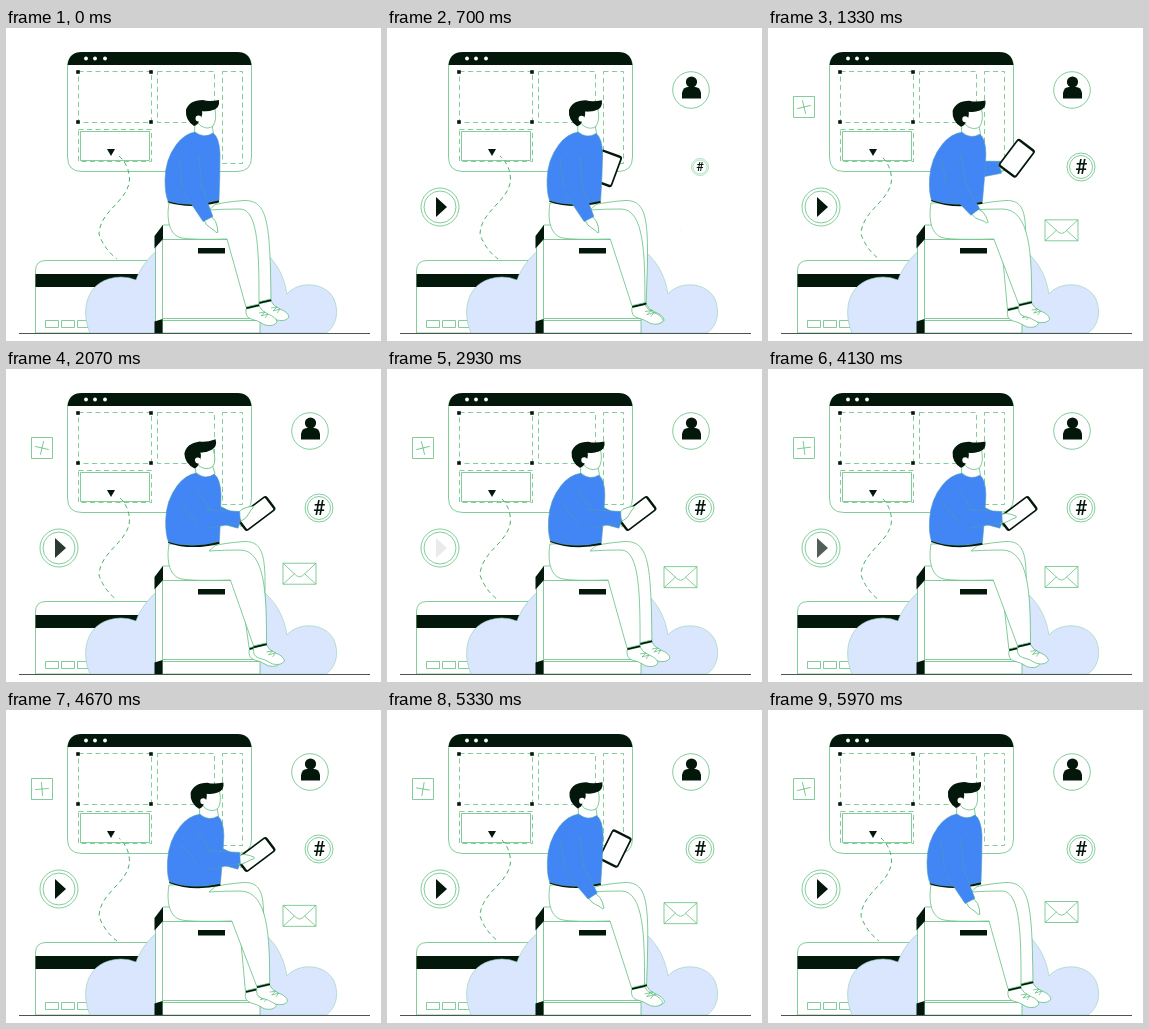
These frames come from a looping animation (375 px wide and 313 px high, 6 s). An HTML page with a canvas:

```html
<!DOCTYPE html>
<html>
<head>
<meta charset="utf-8">
<style>
html, body { margin: 0; width: 100%; height: 100%; overflow: hidden; background: #fff; }
canvas { display: block; }
</style>
</head>
<body>
<canvas width="375" height="313"></canvas>
<script>
const c = document.querySelector('canvas').getContext('2d');
const LOOP = 6000, INK = '#03170b', GREEN = '#58bd78', BLUE = '#4285f4', SEAM = '#4a9fb8', SKY = '#dae6fd', WHITE = '#fff';
const RAD = Math.PI / 180;

function shape(d, fill, stroke = GREEN, width = 0.75) {
  const path = new Path2D(d);
  if (fill) { c.fillStyle = fill; c.fill(path); }
  if (stroke) { c.strokeStyle = stroke; c.lineWidth = width; c.stroke(path); }
}
const box = (x, y, w, h, fill, stroke) => shape(`M${x} ${y}h${w}v${h}h${-w}Z`, fill, stroke);
const disc = (x, y, r, fill, stroke) =>
  shape(`M${x - r} ${y}a${r} ${r} 0 1 1 ${2 * r} 0a${r} ${r} 0 1 1 ${-2 * r} 0Z`, fill, stroke);

function dashed(draw, pattern, offset = 0) {
  c.setLineDash(pattern);
  c.lineDashOffset = offset;
  draw();
  c.setLineDash([]);
}

function at(x, y, angle, scale, draw) {
  c.save();
  c.translate(x, y);
  c.rotate(angle * RAD);
  c.scale(scale, scale);
  draw();
  c.restore();
}

// Turn whatever is drawn about a fixed point
const pivot = (x, y, angle, draw) => at(x, y, angle, 1, () => { c.translate(-x, -y); draw(); });

const span = (t, from, to) => {
  const u = Math.min(1, Math.max(0, (t - from) / (to - from)));
  return u * u * (3 - 2 * u);
};
const wave = (t, period) => Math.cos(2 * Math.PI * t / period);
const mix = (a, b, u) => a.map((v, i) => v + (b[i] - v) * u);

// Arm: elbow x, y, wrist x, y, hand angle
const HANGING = [186, 160, 202, 191, 57], READING = [200, 150, 234, 148, -37];
// Tablet: centre x, y, angle, length, width
const HIDDEN = [198, 150, 10, 33, 22], RAISED = [248.5, 127.5, 34, 34, 23], FLAT = [250, 144.5, 53, 38, 18];

function screen(t) {
  shape('M61.5 129V39Q61.5 24.5 76 24.5H231Q245.5 24.5 245.5 39V129Q245.5 143.5 231 143.5H76Q61.5 143.5 61.5 129Z', WHITE);
  shape('M61.5 37Q63 24 76 24H231Q244 24 245.5 37Z', INK, null);
  [80, 89, 99].forEach(x => disc(x, 30.5, 1.9, WHITE, null));
  dashed(() => {
    box(72.5, 43.5, 73, 51);
    box(151.5, 43.5, 57, 51);
    box(216.5, 43.5, 20, 92);
    box(72.5, 101.5, 73, 32);
  }, [5, 3.5]);
  for (const x of [72, 145]) for (const y of [44, 94]) box(x - 1.8, y - 1.8, 3.6, 3.6, INK, null);
  box(74.5, 103.5, 69, 29, WHITE);
  shape('M101 121H109L105 128Z', INK, null);
  dashed(() => shape('M113 128Q123 137 123.5 151C123 173 94 182 93 206Q98 221 111 231', null, '#35a85a', 0.9),
    [4.5, 3.5], -t * 0.02);
}

function scenery() {
  shape('M29.5 305V243Q29.5 232.5 40 232.5H160V305Z', WHITE);
  box(29.5, 246, 120, 13, INK, null);
  for (let i = 0; i < 3; i++) box(39.5 + 16 * i, 292.5, 13, 7);
  shape('M84 305C74 282 80 250 115 249Q123 249 130 252C140 224 170 204 202 204C240 204 275 225 281 266' +
    'C292 253 319 253 328 271C334 286 329 299 320 305Z', SKY, '#8fd0b4', 0.6);
  shape('M149.5 305V208L157 197H254V305Z', WHITE);
  shape('M156.5 197V305M157 211.5H254M157 290.5H254M157 292.5H254', null);
  shape('M148.5 208L157 197V211L148.5 220.5Z', INK, null);
  shape('M148.5 293.5L156.5 291V305H148.5Z', INK, null);
  box(192, 220, 27, 5.5, INK, null);
}

function shoe(x, y) {
  at(x, y, 0, 1, () => {
    shape('M-7 2L6 -1Q8 4 15 7Q23 10 24 15Q21 20 12 18Q4 13 -2 12Q-8 10 -7 2Z', WHITE);
    shape('M6 6L12 5L8 9L15 7L12 11', null);
    shape('M-7 0L6 -3L6.5 -1L-6.5 2Z', INK, null);
  });
}

function legs(t) {
  const s = wave(t, 3000);
  const fx = 252.5 - 5.5 * s, fy = 277.5 + 1.5 * s, bx = 252.5 + 6.5 * s, by = 277.5 - 3.5 * s;
  shoe(bx, by);
  shape(`M195 180Q215 174 238 172.5C262 172 ${262 + 2 * s} 195 ${bx + 6} ${by - 3}L${bx - 7} ${by}L232 200Z`, WHITE);
  shoe(fx, fy);
  shape(`M163 175C160 193 164 208 176 210Q186 212 ${223.5 - 2.5 * s} 211L${fx - 7} ${fy}L${fx + 6} ${fy - 3}` +
    `C${fx + 6} 228 ${258 - 5 * s} 181 234 181Q218 181 203 182L212 174Z`, WHITE);
}

// A tapering limb segment with a round joint at its start
function sleeve(x1, y1, x2, y2, wide, thin) {
  const a = Math.atan2(y2 - y1, x2 - x1), nx = -Math.sin(a), ny = Math.cos(a);
  disc(x1, y1, wide, BLUE, null);
  shape(`M${x1 + nx * wide} ${y1 + ny * wide}L${x2 + nx * thin} ${y2 + ny * thin}` +
    `L${x2 - nx * thin} ${y2 - ny * thin}L${x1 - nx * wide} ${y1 - ny * wide}`, BLUE, SEAM, 0.6);
}

const hand = (x, y, angle) => at(x, y, angle, 1, () =>
  shape('M-1 -4L6 -5Q12 -4 16.5 -1Q17 1 13 1L8 3Q5 5 -1 4Z', WHITE));

function panel(w, h, r, fill) {
  c.fillStyle = fill;
  c.beginPath();
  c.roundRect(-w / 2, -h / 2, w, h, r);
  c.fill();
}

function tablet(hold, reach) {
  const [x, y, angle, length, width] = mix(mix(HIDDEN, RAISED, hold), FLAT, reach);
  sleeve(203, 142, x - 16, y + 9, 9, 6);
  hand(x - 16, y + 9, -25);
  at(x, y, angle, 1, () => {
    panel(width, length, 3, INK);
    panel(width - 3.4, length - 4.8, 1, WHITE);
  });
}

function head() {
  shape('M189 92L188.5 105Q198 112 207.5 106L206 97Z', WHITE);
  shape('M191 84L209 81Q211 92 207 98Q202 102 195 98Q189 94 191 84Z', WHITE);
  shape('M188 98Q179 92 180 82Q183 72 197 72Q203 74 213 72Q214 80 207 82Q202 84 196 83Q197 88 193 93Q192 97 188 98Z', INK, null);
  disc(192.5, 90.5, 3, WHITE, null);
}

function man(t) {
  const hold = span(t, 250, 1250) - span(t, 5000, 5700);
  const reach = span(t, 1100, 2000) - span(t, 4700, 5500);
  const glance = span(t, 1500, 2050) - span(t, 2150, 2700);
  const tap = span(t, 3000, 3600);
  const [ex, ey, wx, wy, bend] = mix(HANGING, READING, reach);

  legs(t);
  tablet(hold, reach);
  pivot(187, 200, 3 * hold - 2.2 * glance, () => {
    shape('M162 173Q185 180.5 213 173', null, INK, 2.6);
    pivot(197, 104, -4 * hold - 5 * glance, head);
    shape('M189 104Q178 106 170 117Q159 132 159 152Q159 166 162 173Q185 180 213 172Q214 150 214 125' +
      'Q213 109 207 105Q198 111 189 104Z', BLUE, SEAM, 0.6);
  });
  sleeve(183, 128, ex, ey, 10, 9.5);
  hand(wx - 2 * tap * reach, wy + 2 * tap * reach, bend + 31 * tap * reach);
  sleeve(ex, ey, wx, wy, 9.5, 5.5);
}

function play(t) {
  disc(0, 0, 19, WHITE);
  disc(0, 0, 16, WHITE);
  c.globalAlpha = 1 - span(t, 1700, 3200) + span(t, 3500, 4500);
  shape('M-4 -10V10L7 0Z', INK, null);
  c.globalAlpha = 1;
}

function person() {
  disc(0, 0, 18.3, WHITE);
  disc(0.5, -8, 5.6, INK, null);
  shape('M-9 8.5V3Q-8 -3 -3 -3H4Q9 -3 10 3V8.5Z', INK, null);
}

function hash() {
  disc(0, 0, 14, WHITE);
  disc(0, 0, 11.5, WHITE);
  c.fillStyle = INK;
  c.font = '500 20px Roboto, sans-serif';
  c.textAlign = 'center';
  c.fillText('#', 0, 7);
}

function envelope(t) {
  c.translate(0, 7 * Math.sin(Math.PI * Math.max(0, t - 1000) / 5000) ** 2);
  box(-16.5, -10.5, 33, 21, WHITE);
  shape('M-16.5 -10.5L-3 2Q0 4.5 3 2L16.5 -10.5M-16.5 10.5L-5 0M16.5 10.5L5 0', null);
}

function cross(t) {
  box(-10.5, -10.5, 21, 21, WHITE);
  c.rotate(-14 * RAD * wave(t + 110, 1500));
  shape('M0 -7V7M-7 0H7', null);
}

const ICONS = [[53, 179, play], [304, 62, person], [313, 139, hash], [293.5, 202, envelope], [36, 79, cross]];

function icons(t) {
  ICONS.forEach(([x, y, draw], i) => {
    const start = 200 + 150 * i, size = span(t, start, start + 350);
    if (size) at(x, y, 0, size, () => draw(t));
  });
}

function frame(t) {
  c.fillStyle = WHITE;
  c.fillRect(0, 0, 375, 313);
  c.lineJoin = 'round';
  screen(t);
  scenery();
  shape('M13 305.5H364', null, '#4b5550', 1);
  man(t);
  icons(t);
}

const start = performance.now();
(function tick() {
  frame((performance.now() - start) % LOOP);
  requestAnimationFrame(tick);
})();
</script>
</body>
</html>
```
